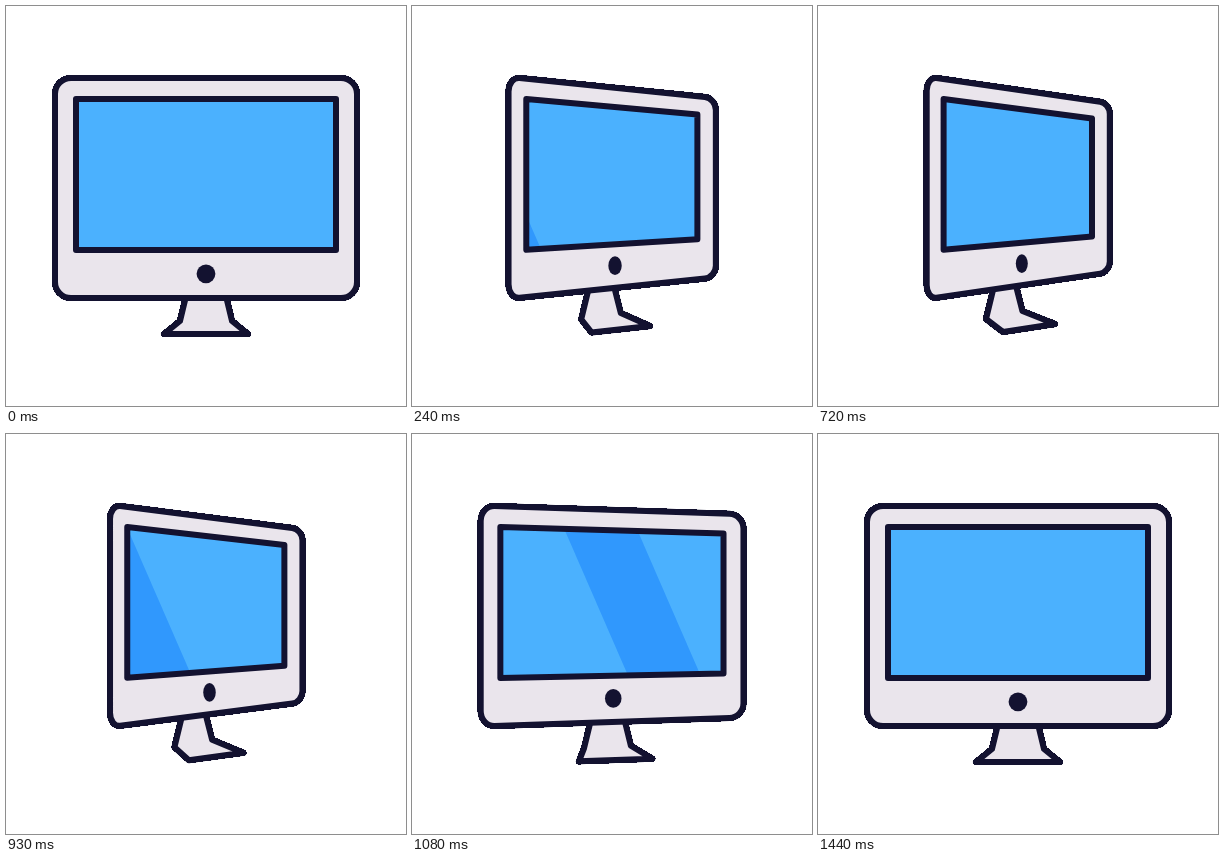
These frames come from a looping animation (400x400 px, 3.62 s). An HTML page:

```html
<!DOCTYPE html>
<html lang="en">
<head>
<meta charset="utf-8">
<title>Turning monitor</title>
<style>
  html, body { margin: 0; width: 100%; height: 100%; overflow: hidden; background: #fff; }
  svg { display: block; width: 100vw; height: 100vh; }
  .line { stroke: #131230; stroke-width: 6; stroke-linejoin: round; }
  .edge { stroke: #131230; stroke-width: 6.5; stroke-linejoin: round; shape-rendering: crispEdges; }
  .case { fill: #eae5ec; }
</style>
</head>
<body>
<svg viewBox="0 0 400 400">
  <defs>
    <path id="stand"/>
    <path id="body"/>
    <path id="screen"/>
    <clipPath id="glass"><use href="#screen"/></clipPath>
  </defs>
  <use href="#stand" class="edge"/>
  <use href="#body" class="edge"/>
  <use href="#stand" class="line case"/>
  <use href="#body" class="line case"/>
  <use href="#screen" fill="#4bb1fe"/>
  <g clip-path="url(#glass)" fill="#3098fd">
    <path id="glare1"/>
    <path id="glare2"/>
  </g>
  <use href="#screen" class="line" fill="none"/>
  <ellipse id="button" fill="#131230"/>
</svg>
<script>
const LOOP = 3620, STEP = 30, LAST = 1440;
const TURN = 338, BACK = 872;
const SPEED = 0.688, SLANT = 0.435, BAND = 72.6;

const $ = id => document.getElementById(id);
const clamp = v => Math.min(1, Math.max(0, v));
const ease = v => { const s = clamp(v); return s * s * (3 - 2 * s); };
const mix = (a, b, p) => a + (b - a) * p;
const between = (a, b, p) => [mix(a[0], b[0], p), mix(a[1], b[1], p)];
const polygon = pts => `M${pts.join(' L')} Z`;

// Upright left and right sides; the far side is shortened at top and bottom
const quad = (l, r, t, b, top, bottom) => [[l, t], [r, t + top], [r, b - bottom], [l, b]];

// Round each corner by a share of the two edges that meet there
function rounded(pts, across, down) {
  const parts = pts.map((c, i) => {
    const [into, out] = i % 2 ? [across, down] : [down, across];
    const a = pts[(i + 3) % 4], b = pts[(i + 1) % 4];
    return `${between(c, a, into)} C${between(c, a, into * 0.45)} `
      + `${between(c, b, out * 0.45)} ${between(c, b, out)}`;
  });
  return `M${parts.join(' L')} Z`;
}

// Top, neck and foot, each a level of a given half width
function standPoints(p) {
  const tilt = 4 * p;
  const level = (x, y, half) => [[x - half, y + tilt], [x + half, y - tilt]];
  const rows = [
    level(mix(200, 186, p), mix(286, 278, p), mix(19, 10.5, p)),
    level(mix(200, 186.2, p), mix(315, 309, p), mix(26, 18.2, p)),
    level(mix(200, 211, p), mix(328, 322, p), mix(42, 26, p))
  ];
  return [...rows.map(r => r[0]), ...rows.reverse().map(r => r[1])];
}

// Slanted band whose right edge is at x on the line y = 96
function band(x) {
  const at = y => x + SLANT * (y - 96);
  return polygon([[at(80) - BAND, 80], [at(80), 80], [at(260), 260], [at(260) - BAND, 260]]);
}

function draw(t) {
  const p = ease(t / TURN) - ease((t - BACK) / TURN);
  const body = quad(mix(49, 108.7, p), mix(351, 291.8, p), mix(72, 70.6, p), mix(292, 293.2, p), 26.6 * p, 27 * p);
  const screen = quad(mix(70, 125.6, p), mix(330, 274, p), 93, 244 - 0.2 * p, 19.5 * p, 13.2 * p);
  const set = (id, d) => $(id).setAttribute('d', d);
  set('body', rounded(body, 0.053, mix(0.073, 0.064, p)));
  set('screen', polygon(screen));
  set('stand', polygon(standPoints(p)));
  set('glare1', band(65 + SPEED * (t - 240)));
  set('glare2', band(163.4 + SPEED * (t - 990)));
  const button = { cx: 200 + 3.8 * p, cy: 267.8 - 10.2 * p, rx: 9.4 - 3.4 * p, ry: 9.4 };
  for (const k in button) $('button').setAttribute(k, button[k]);
}

const start = performance.now();
function tick() {
  const t = (performance.now() - start) % LOOP;
  draw(Math.min(LAST, Math.floor(t / STEP) * STEP));
  requestAnimationFrame(tick);
}
tick();
</script>
</body>
</html>
```
